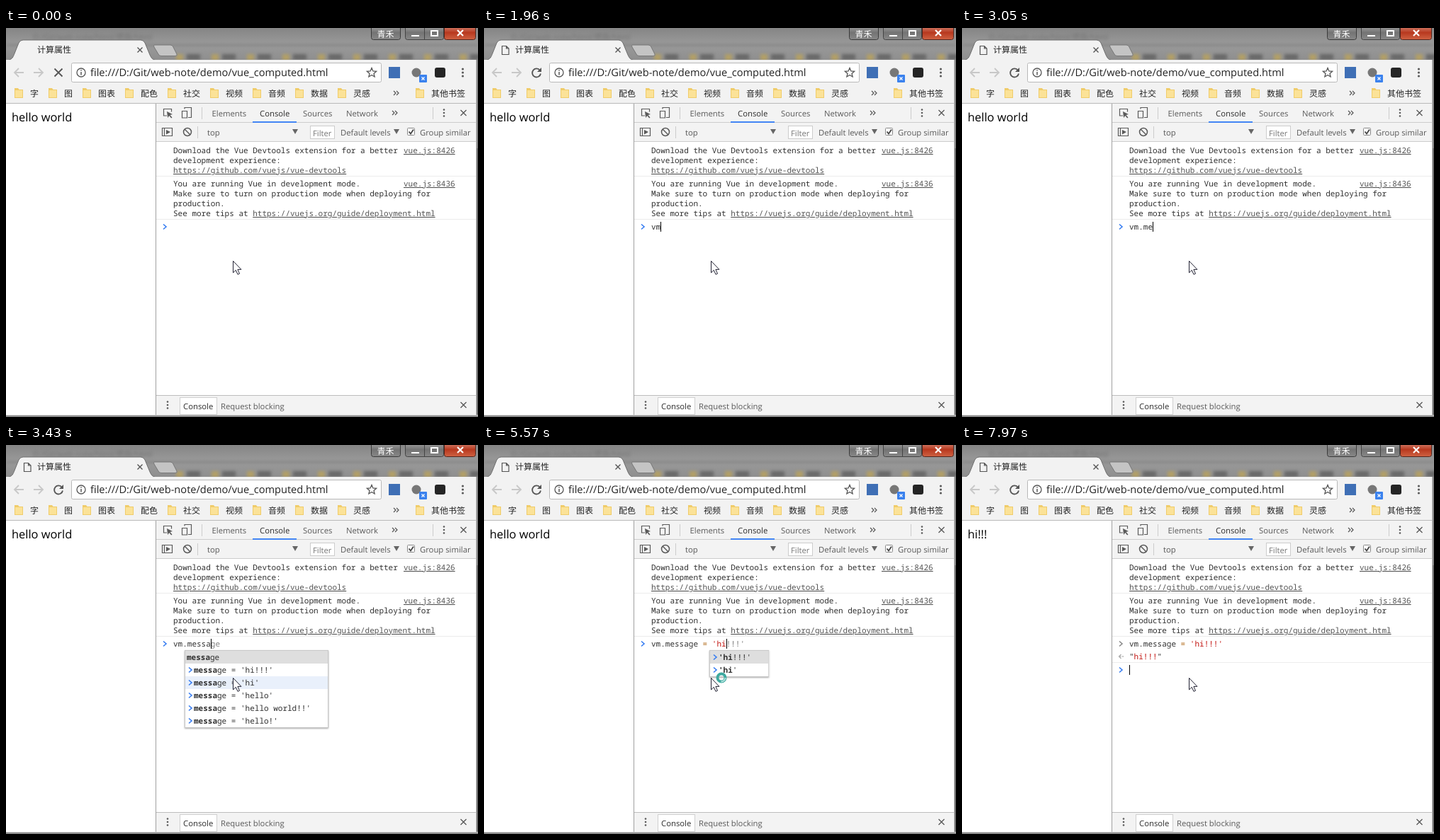
These frames come from a looping animation (666x550 px, 8000 ms). An HTML page:

```html
<!DOCTYPE html>
<html lang="zh">
<head>
<meta charset="utf-8">
<title>计算属性</title>
<style>
html, body { margin: 0; height: 100%; overflow: hidden; background: #fff; }
svg { display: block; width: 666px; height: 550px; }
text { white-space: pre; text-rendering: geometricPrecision; }
.ui { font: 11.3px "Open Sans", sans-serif; fill: #5a5a5a; }
.cjk { font: 12px "Noto Sans CJK SC", "Noto Sans CJK", sans-serif; fill: #222; }
.url { font: 14.6px "Open Sans", sans-serif; fill: #222; }
.page { font: 16.4px "Open Sans", sans-serif; fill: #000; }
.code { font: 11px "Noto Sans Mono", monospace; fill: #303030; }
.u { text-decoration: underline; fill: #545454; }
.str { fill: #c41a16; }
.op { fill: #a85a00; }
.ghost { fill: #808080; }
.b { font-weight: bold; }
</style>
</head>
<body>
<svg viewBox="0 0 666 550">
  <defs>
    <linearGradient id="glass" x2="0" y2="1">
      <stop stop-color="#858585"/><stop offset=".5" stop-color="#9a9a9a"/><stop offset="1" stop-color="#8e8e8e"/>
    </linearGradient>
    <linearGradient id="btn" x2="0" y2="1">
      <stop stop-color="#a2a2a2"/><stop offset=".5" stop-color="#747474"/><stop offset="1" stop-color="#888"/>
    </linearGradient>
    <linearGradient id="red" x2="0" y2="1">
      <stop stop-color="#d58a78"/><stop offset=".5" stop-color="#b8391f"/><stop offset="1" stop-color="#cf6243"/>
    </linearGradient>
    <filter id="blur"><feGaussianBlur stdDeviation="2.2"/></filter>
    <filter id="shade" x="-10%" y="-10%" width="120%" height="125%">
      <feDropShadow dx="0" dy="1" stdDeviation="1" flood-opacity=".35"/>
    </filter>
  </defs>
  <g id="frame"></g>
  <g id="live"></g>
</svg>
<script>
const LOOP = 8000, CHAR = 6.6;
const $ = id => document.getElementById(id);
const esc = s => s.replace(/&/g, '&amp;').replace(/</g, '&lt;');
const raw = (x, y, cls, s) => `<text x="${x}" y="${y}" class="${cls}">${s}</text>`;
const text = (x, y, cls, s) => raw(x, y, cls, esc(s));
const span = (cls, s) => `<tspan class="${cls}">${s}</tspan>`;
const rect = (x, y, w, h, fill, more = '') =>
  `<rect x="${x}" y="${y}" width="${w}" height="${h}" fill="${fill}" ${more}/>`;
const line = (d, color, w = 1, fill = 'none') =>
  `<path d="${d}" stroke="${color}" stroke-width="${w}" fill="${fill}"/>`;
const shape = (d, fill) => `<path d="${d}" fill="${fill}"/>`;
const dots = (x, y, gap, r) => [-gap, 0, gap].map(d =>
  `<circle cx="${x}" cy="${y + d}" r="${r}" fill="#5a5a5a"/>`).join('');
const cross = (x, y, r, color, w) =>
  line(`M${x - r} ${y - r}l${2 * r} ${2 * r}m0 ${-2 * r}l${-2 * r} ${2 * r}`, color, w);
const more = (x, y) => line(`M${x} ${y - 3}l3 3-3 3m4-6l3 3-3 3`, '#555', 1.2);
const folder = x => shape(`M${x} 85h5l1.5 2h5.5v12h-12z`, '#f0cc6a') +
  shape(`M${x + 1} 88h10v10h-10z`, '#fbe298');

function titleBar() {
  let smear = text(38, 17, 'ui', 'D:/Git/web-note/html/项目/html');
  for (let x = 240; x < 666; x += 50)
    smear += rect(x, 37, 10, 9, '#c9a948') + rect(x + 15, 37, 19, 8, '#4e4e4e');
  const sign = (d) => line(d, '#fff', 2);
  return rect(0, 0, 666, 46, 'url(#glass)') +
    `<g filter="url(#blur)" opacity=".6">${smear}${rect(0, 23, 666, 2, '#666')}</g>` +
    line('M4 45C9 44 10 41 12 36L18 21Q20 17 24 17H190Q194 17 196 21L203 38Q206 45 210 45', '#6d6d6d', 1, '#f2f2f2') +
    line('M209 24H232Q235 24 236 27L241 37Q242 39.500 239 39.500H219Q216 39.500 215 37L209 27Q208 24 209 24Z', '#777', 1, '#c4c4c4') +
    text(44, 35, 'cjk', '计算属性') + cross(189, 31, 3.5, '#555', 1.4) +
    rect(515.5, -3.5, 41, 20, 'url(#btn)', 'rx="3" stroke="#3b3b3b"') +
    `<text x="523.500" y="13" class="cjk" style="fill:#fff">青禾</text>` +
    rect(563.5, -3.5, 54, 20, 'url(#btn)', 'rx="3" stroke="#444"') +
    rect(618.5, -3.5, 44, 20, 'url(#red)', 'rx="3" stroke="#53251c"') +
    line('M590.5 0V16', '#444') +
    sign('M572 11h11') + sign('M600 4h9v7h-9z') + cross(641, 7, 4, '#fff', 2.2);
}

function toolbar() {
  const marks = [[12, '字'], [60, '图'], [108, '图表'], [168, '配色'], [228, '社交'],
    [288, '视频'], [348, '音频'], [408, '数据'], [468, '灵感'], [578, '其他书签']];
  return rect(0, 45, 663, 62, '#f2f2f2') +
    line('M25 63H12m6-6l-6 6 6 6M39 63h13m-6-6l6 6-6 6', '#c8c8c8', 1.8) +
    rect(92.5, 49.5, 437, 27, '#fff', 'rx="2" stroke="#b8b8b8"') +
    `<circle cx="106" cy="63" r="6" fill="none" stroke="#555" stroke-width="1.3"/>` +
    line('M106 62v4.500m0-7.500v1.600', '#555', 1.5) +
    text(119, 68, 'url', 'file:///D:/Git/web-note/demo/vue_computed.html') +
    line('M516 56.500l1.900 4.400 4.700.4-3.600 3.100 1.100 4.600-4.100-2.500-4.100 2.500 1.100-4.600-3.600-3.100 4.700-.4z', '#555', 1.3) +
    rect(540, 55, 16, 16, '#3f6fb5') +
    `<circle cx="579" cy="63" r="6.500" fill="#777"/>` +
    rect(583, 66, 11, 11, '#3b82ee', 'rx="1"') + cross(588.5, 71.5, 2, '#fff', 1.2) +
    rect(605, 56, 15, 14, '#252525', 'rx="3"') + dots(644.5, 63, 5, 1.6) +
    marks.map(([x, s]) => folder(x) + text(x + 22, 97, 'cjk', s)).join('') +
    more(547, 92) + line('M0 106.5H663', '#b9b9b9');
}

function devtools() {
  const tabs = [[290.5, 'Elements'], [358, 'Console'], [419, 'Sources'], [480, 'Network']];
  const down = x => shape(`M${x} 143h8l-4 7z`, '#666');
  return rect(212, 107, 451, 54, '#f3f3f3') +
    line('M211.5 107V547', '#a0a0a0') + line('M212 133.500H663M212 160.500H663', '#ccc') +
    rect(348, 132, 62, 2, '#4285f4') +
    line('M227 124h-4.500v-9.500h11v4', '#5a5a5a', 1.2) + shape('M227 118l8 4-3.500 1 3 3.500-1.300 1-3-3.500-2 3z', '#5a5a5a') +
    line('M252 114.500v-2h9.500v14H257M248.500 117.500h7v9.500h-7z', '#5a5a5a', 1.2) +
    line('M276.500 112v17M602.500 112v17M270.500 139v17', '#ccc') +
    tabs.map(([x, s]) => `<g ${s === 'Console' ? 'style="filter:brightness(.5)"' : ''}>${text(x, 125, 'ui', s)}</g>`).join('') +
    more(545, 120) + dots(618, 120, 4.5, 1.3) + cross(645.5, 120, 4, '#555', 1.3) +
    line('M220.500 141.500h14v11h-14zM223.500 142v10', '#5a5a5a', 1.2) + shape('M226 144l6 3-6 3.500z', '#5a5a5a') +
    `<circle cx="256" cy="147" r="5.500" fill="none" stroke="#5a5a5a" stroke-width="1.500"/>` +
    line('M252 143l8 8', '#5a5a5a', 1.5) +
    text(284, 152, 'ui', 'top') + down(404) +
    rect(429.5, 138.5, 34, 18, '#fff', 'stroke="#ccc"') +
    `<text x="433" y="153" class="ui" style="fill:#777">Filter</text>` +
    text(472, 152, 'ui', 'Default levels') + down(547) +
    rect(566.5, 141.5, 10, 10, '#fff', 'rx="1" stroke="#888"') + line('M568.500 146.500l2.500 3 4-6', '#444', 1.8) +
    text(584, 152, 'ui', 'Group similar') +
    rect(212, 519, 451, 28, '#f3f3f3') + line('M212 519.500H663', '#bdbdbd') +
    dots(228, 533, 4.5, 1.3) + rect(245.5, 522.5, 52, 24, '#fff', 'stroke="#d0d0d0"') +
    `<g style="filter:brightness(.5)">${text(250, 538.5, 'ui', 'Console')}</g>` +
    text(303, 538.5, 'ui', 'Request blocking') + cross(645.5, 533, 4, '#555', 1.3);
}

function messages() {
  const rows = [
    [177, 'Download the Vue Devtools extension for a better'], [191, 'development experience:'],
    [224, 'You are running Vue in development mode.'],
    [238, 'Make sure to turn on production mode when deploying for'],
    [252, 'production.'], [266, 'See more tips at ']];
  const links = [[236, 205, 'https://github.com/vuejs/vue-devtools'],
    [348.2, 266, 'https://vuejs.org/guide/deployment.html'],
    [561, 177, 'vue.js:8426'], [561, 224, 'vue.js:8436']];
  return rows.map(([y, s]) => text(236, y, 'code', s)).join('') +
    links.map(([x, y, s]) => text(x, y, 'code u', s)).join('') +
    line('M212 209.500H663M212 270.500H663', '#ececec');
}

$('frame').innerHTML = rect(0, 107, 666, 443, '#fff') + titleBar() + toolbar() + devtools() +
  rect(663, 45, 3, 505, '#858585') + rect(663, 45, 1, 505, '#bbb') + rect(664, 170, 2, 380, '#6e6e6e') +
  rect(0, 547, 666, 3, '#8a8a8a') + rect(0, 547, 666, 1, '#c4c4c4');

const all = ('$attrs $children $createElement $el $listeners $options $parent ' +
  '$refs $root $scopedSlots $slots $vnode getMessage message').split(' ');
const past = ["hi!!!", "hi", "hello", "hello world!!", "hello!"].map(s => `>message = '${s}'`);
const six = ['message', ...past], four = past.slice(0, 3).concat(">message = ''");
const his = [">'hi!!!'", ">'hi'"];

// [start, typed text, grey completion, popup rows]
const steps = [
  [0, ''], [1660, 'v'], [1960, 'vm'], [2050, 'vm.'], [2150, 'vm.', '', all], [2410, 'vm.m', '', all],
  [2500, 'vm.m', 'essage', six], [3050, 'vm.me'], [3140, 'vm.me', 'ssage', six],
  [3230, 'vm.mes', 'sage', six], [3330, 'vm.mess', 'age', six], [3420, 'vm.messa', 'ge', six],
  [3520, 'vm.messag', 'e', six], [3610, 'vm.message', '', four], [3790, 'vm.message '],
  [3980, 'vm.message ='], [4170, 'vm.message = '],
  [4450, "vm.message = '", "hi!!!'", his], [4810, "vm.message = 'h"],
  [5170, "vm.message = 'h", "i!!!'", his], [5570, "vm.message = 'hi", "!!!'", his],
  [5950, "vm.message = 'hi!"], [6130, "vm.message = 'hi!!"], [6210, "vm.message = 'hi!!!"],
  [6490, "vm.message = 'hi!!!'"], [6950, '']];

const paint = s => s.replace(/=|'.*/g, m => span(m === '=' ? 'op' : 'str', m));
const chevron = (x, y, color) => line(`M${x} ${y - 3.5}l4 3.500-4 3.500`, color, 1.6);

function popup(rows, typed) {
  const full = rows === all, quote = rows === his;
  const x = quote ? 318 : 252, h = rows.length * 18 + 2;
  const longest = Math.max(...rows.map(s => s.length - 1));
  const w = full ? 159 : longest * CHAR + 38;
  const match = full ? 0 : typed.length - (quote ? 13 : 3);
  let out = rect(x, 290, w, h, '#fff', 'filter="url(#shade)"') +
    rect(x + .5, 290.5, w - 1, h - 1, '#fff', 'stroke="#c8c8c8"') + rect(x + 1, 291, w - 2, 18, '#dedede');
  if (rows.length > 2) out += rect(x + 1, 327, w - 2, 18, '#e9f0fb');
  rows.forEach((row, i) => {
    const old = row[0] === '>', s = old ? row.slice(1) : row, y = 304 + i * 18;
    if (old) out += chevron(x + 6, y - 4, '#367cf1');
    out += raw(x + (old ? 13 : 3), y, 'code', span('b', s.slice(0, match)) + s.slice(match));
  });
  if (full) out += text(357, 304, 'code', 'Vue$3') + rect(394, 291, 16, 253, '#f1f1f1') +
    rect(396, 308, 13, 39, '#c1c1c1') + shape('M399 301h8l-4-4z', '#a3a3a3') + shape('M399 533h8l-4 4z', '#505050');
  return out;
}

function pointer(busy) {
  const arrow = line('M320.500 329.500v16.500l3.800-3.600 2.700 6 2.500-1.100-2.600-5.900h5z', '#223', 1, '#fff');
  return arrow + (busy ? `<circle cx="335" cy="329" r="5.500" fill="none" stroke="#3fa9a0" stroke-width="4"/>
    <circle cx="335" cy="329" r="5.500" fill="none" stroke="#b5e6df" stroke-width="2" stroke-dasharray="9 26"/>` : '');
}

function scene(t) {
  const [, typed, ghost = '', rows] = steps.findLast(s => s[0] <= t);
  const done = t >= 7130, loaded = t >= 290, cleared = t >= 200 && t < 290;
  const y = cleared ? 177 : done ? 322 : 285;
  const caret = (t >= 260 && t < 820) || (t >= 1380 && t < 7410) || t >= 7970;
  let out = text(8, 132, 'page', done ? 'hi!!!' : 'hello world');
  out += loaded
    ? line('M25.500 25.500h6l3.500 3.500v8.500h-9.500zM31.500 25.500v3.500h3.500', '#555', 1.2) +
      line('M79 60A6 6 0 1 0 80 64.500', '#555', 1.8) + shape('M81 56v6h-6z', '#555')
    : cross(74, 63, 5.5, '#555', 1.8);
  if (!cleared) out += messages();
  if (done) out += chevron(222, 281, '#8a8a8a') + raw(236, 285, 'code', paint("vm.message = 'hi!!!'")) +
    line('M224.500 296l-3 3 3 3M222 299h3', '#aaa', 1.2) + `<circle cx="227" cy="299" r=".9" fill="#aaa"/>` +
    raw(236, 303, 'code', '"' + span('str', 'hi!!!') + '"') + line('M212 307.500H663', '#ececec');
  out += chevron(222, y - 4, '#367cf1') + raw(236, y, 'code', paint(typed) + span('ghost', ghost));
  if (caret) out += rect(Math.round(236 + typed.length * CHAR), y - 11, 1, 14, '#000');
  if (rows) out += popup(rows, typed);
  return out + pointer(t >= 5370 && t < 6490);
}

let shown = '';
function tick() {
  const next = scene(performance.now() % LOOP);
  if (next !== shown) $('live').innerHTML = shown = next;
  requestAnimationFrame(tick);
}
tick();
</script>
</body>
</html>
```
